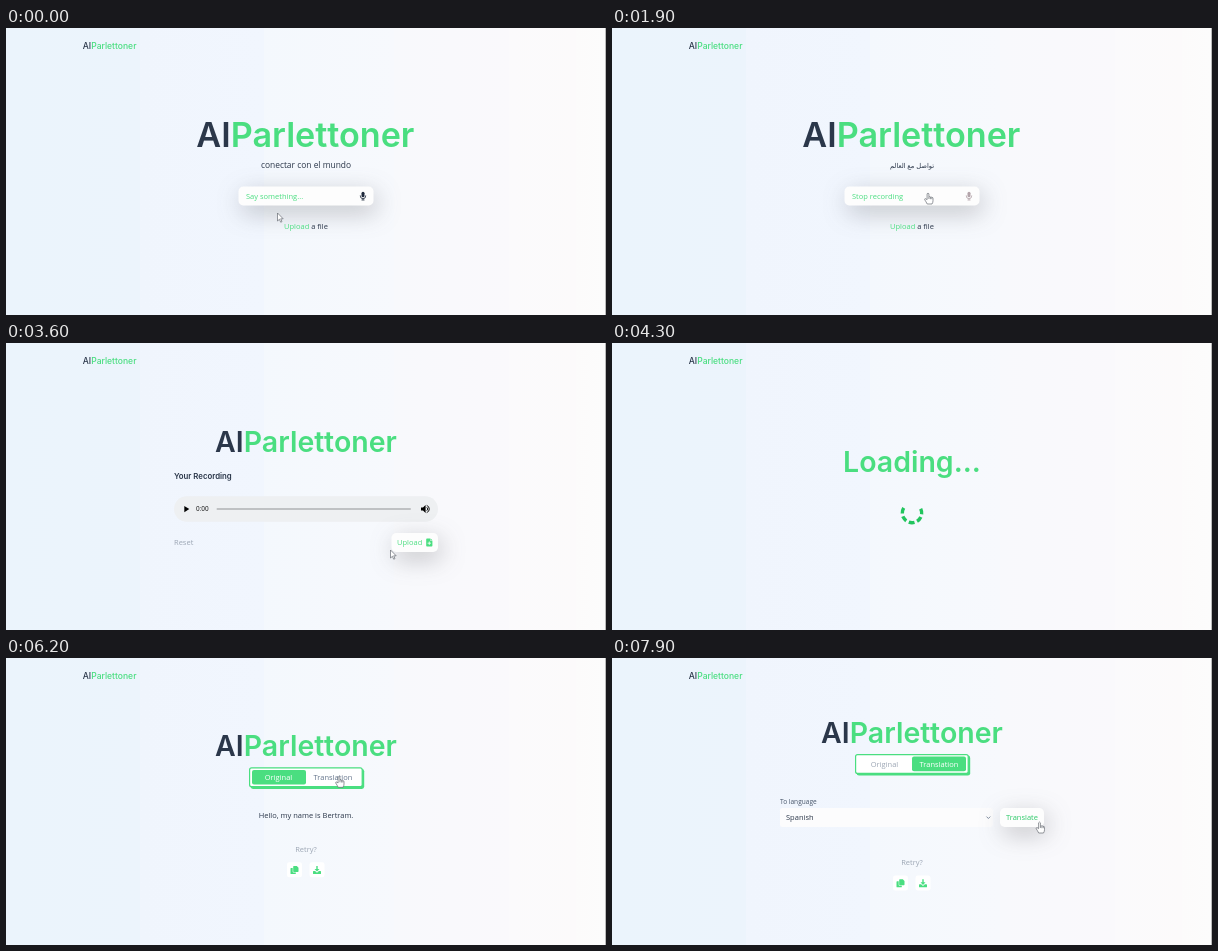
Recreate the animation shown at these times as an HTML page. Size 600 by 287 pixels, loop 8000 ms.

```html
<!DOCTYPE html>
<html lang="en">
<head>
<meta charset="utf-8">
<title>Interpreter demo</title>
<style>
  html, body { margin: 0; width: 100%; height: 100%; overflow: hidden; }
  svg { display: block; width: 100%; height: 100%; }
  text { font: 7.5px "Open Sans", "Noto Sans", sans-serif; fill: #2b374a; white-space: pre; }
  .head { font-family: Inter, sans-serif; font-weight: 600; }
  .mid { text-anchor: middle; }
  .end { text-anchor: end; }
  .green { fill: #4ade80; }
  .grey { fill: #9ca6b4; }
  .raised { fill: #fdfdfd; filter: drop-shadow(3px 7px 12px rgba(75, 75, 82, .32)); }
  .hover { fill: #2cc968; }
</style>
</head>
<body>
<svg id="stage" viewBox="0 0 600 287" preserveAspectRatio="none"></svg>
<script>
const LOOP = 8000;
const stage = document.getElementById('stage');

const text = (x, y, s, cls = '', style = '', id = '') =>
  `<text ${id && `id="${id}"`} x="${x}" y="${y}" class="${cls}" style="${style}">${s}</text>`;
const box = (x, y, w, h, r, attrs = 'fill="#fff"') =>
  `<rect x="${x}" y="${y}" width="${w}" height="${h}" rx="${r}" ${attrs}/>`;
const group = (id, body, attrs = '') => `<g id="${id}" ${attrs}>${body}</g>`;
const at = (x, y, body) => `<g transform="translate(${x} ${y})">${body}</g>`;

// Two-colour name, split at x
const brand = (x, y, size, weight = 600) => {
  const style = `font-size:${size}px;font-weight:${weight}`;
  return text(x, y, 'AI', 'head end', style) +
    text(x, y, 'Parlettoner', 'head green', style);
};

const mic = at(357, 168, `<g id="mic">
  ${box(-1.5, -4.2, 3, 5.4, 1.5, 'stroke="none"')}
  <path d="M-2.7-.6V0a2.7 2.7 0 0 0 5.4 0v-.6M0 2.7V4M-1.5 4h3" fill="none" stroke-width=".8"/></g>`);

const speaker = at(415, 166, `<path d="M0-1.5h2L4.6-4v8L2 1.5H0z"/>
  <path d="M5.7-1.7a2 2 0 0 1 0 3.4M5.7-3.6a3.8 3.8 0 0 1 0 7.2" fill="none" stroke="#000" stroke-width=".9"/>`);

const fileIcon = at(420.2, 195.5, `<path class="green" d="M.8 0h3.2v2.2h2.2V7.2q0 .8-.8.8H.8Q0 8 0 7.2V.8Q0 0 .8 0zM4.4 0l1.8 1.8H4.4z"/>
  <path d="M3.1 3v3.4M1.4 4.7h3.4" stroke="#fff" stroke-width=".8"/>`);

const footer = y => text(300, y, 'Retry?', 'mid grey') +
  box(281, y + 10.3, 15, 15, 2.3) + box(303.5, y + 10.3, 15, 15, 2.3) +
  at(284.5, y + 14, `<path class="green" d="M3.3 0h3l1.7 1.7v3.6q0 .6-.6.6H3.3q-.6 0-.6-.6V.6Q2.7 0 3.3 0z
    M.6 2h1.6v3.8q0 .6.6.6h2.5v1q0 .6-.6.6H.6Q0 8 0 7.4V2.6Q0 2 .6 2z"/>`) +
  at(307, y + 14, `<path class="green" d="M3.3 0h1.4v3h1.8L4 5.6 1.5 3h1.8z
    M.6 5h1.5L4 6.7 5.9 5h1.5q.6 0 .6.6v1.8q0 .6-.6.6H.6Q0 8 0 7.4V5.6Q0 5 .6 5z"/>`);

const tabs = (y, active) => box(244.6, y + 1.6, 113.6, 20, 2.4, 'class="green"') +
  box(243.6, y + .6, 112.6, 18.8, 2, 'fill="#fff" stroke="#4ade80" stroke-width="1.2"') +
  box(active ? 300 : 246, y + 2.6, 54, 14.6, 2, 'class="green"') +
  ['Original', 'Translation'].map((s, i) =>
    text(i ? 327 : 272.5, y + 12.6, s, 'mid' + (i === active ? '' : ' grey'),
      i === active ? 'fill:#fff' : i ? 'fill:#64748b' : '')).join('');

// Scene: id, start time, content
const scenes = [
  ['home', 0,
    brand(224.7, 118.5, 34.2) +
    text(300, 140, '', 'mid', '', 'tagline') +
    box(232.5, 158.5, 135, 19, 4.7, 'class="raised"') +
    text(240, 170.7, '', 'green', '', 'prompt') + mic +
    text(278, 200.5, '<tspan class="green">Upload</tspan> a file')],
  ['recording', 3000,
    brand(237.7, 108.5, 28.5) +
    text(168, 135.5, 'Your Recording', 'head', 'font-size:7.8px') +
    box(168, 153.3, 264, 25.4, 12.7, 'fill="#eef0f2"') +
    '<path d="M178.3 162.9v6.4l5-3.2z"/>' +
    text(190, 168.4, '0:00', '', 'font:6.56px Roboto,sans-serif;fill:#222') +
    box(210.5, 165.1, 194.5, 1.9, .9, 'fill="#bfc1c3"') + speaker +
    text(168, 202, 'Reset', 'grey') +
    box(385.5, 190, 46.5, 19, 4.7, 'class="raised"') +
    text(391, 202, 'Upload', 'green', '', 'upload') + fileIcon],
  ['loading', 4200,
    text(300, 129, 'Loading...', 'head green mid', 'font-size:28.5px') +
    at(300, 170, `<circle id="spinner" r="9.7" pathLength="360" fill="none" stroke="#22c55e"
      stroke-width="3.4" stroke-dasharray="34 17 34 17 34 17 34 17 34 122"/>`)],
  ['result', 5200,
    brand(237.7, 97.8, 28.5) + tabs(109.3, 0) +
    text(300, 160.2, 'Hello, my name is Bertram.', 'mid') + footer(194)],
  ['translation', 6400,
    brand(237.7, 84.5, 28.5) + tabs(96, 1) +
    text(168, 146, 'To language', '', 'font-size:6.56px;font-weight:500;fill:#475569') +
    box(168, 150, 213, 19, 2.3, 'fill="#fcfcfd"') +
    text(174, 162.2, '', '', '', 'choice') +
    '<path d="M374.5 158.6l1.9 1.9 1.9-1.9" fill="none" stroke="#64748b" stroke-width=".8"/>' +
    box(388, 150, 44, 19, 4.7, 'class="raised"') +
    text(410, 162.2, 'Translate', 'mid green', '', 'translate') +
    footer(207.3)]
];

// Background bands: x, colour at start, colour at end
const bands = [[0, '#ebf4fc', '#ecf4fc'], [134, '#f0f5fd', '#f1f6fe'], [258, '#f4f8fd', '#f7f9fd'],
  [388, '#f8f9fc', '#faf9fc'], [503, '#fbfafc', '#fcfafb'], [570, '#fcfbfb', '#fcfcfc'], [600]];
const stops = bands.slice(0, -1).map(([x, a, b], i) =>
  `<stop offset="${x / 600}" stop-color="${a}"/><stop offset="${bands[i + 1][0] / 600}" stop-color="${b}"/>`).join('');

stage.innerHTML =
  `<defs><linearGradient id="sky">${stops}</linearGradient></defs>` +
  box(0, 0, 600, 287, 0, 'fill="url(#sky)"') +
  box(599.2, 0, .8, 287, 0, 'fill="#aaa"') +
  brand(85.2, 20.7, 8.55, 500) +
  scenes.map(([id, , body]) => group(id, body)).join('') +
  group('cursor', `
    <path id="arrow" d="M0 0v8l1.9-1.7 1.3 2.9 1.3-.6-1.3-2.8h2.5z"/>
    <path id="hand" d="M-.9.8q.9-1.5 1.8 0v3.1q.8-.6 1.5.2.8-.5 1.4.3 1.2-.2 1.2 1v2.3Q5 9.4 4 11H-.8Q-1.9 8.8-3.3 6.7q-.2-1.2 1-1l1.4 1z
      M.9 4v2M2.4 4.2v2M3.8 4.5v1.7"/>`,
    'fill="#fff" stroke="#5c6068" stroke-width=".65" stroke-linejoin="round"');

const el = {};
stage.querySelectorAll('[id]').forEach(e => el[e.id] = e);

// Pointer path: time, x, y
const path = [[0, 271.5, 185], [150, 271.5, 185], [850, 316, 165], [3000, 316, 165],
  [3600, 384.5, 207], [3700, 384.5, 207], [4000, 402, 201], [5200, 322, 106],
  [5400, 322, 106], [5750, 333, 118.3], [6500, 333, 118.3], [6900, 321.5, 153],
  [7050, 321.5, 157], [7500, 321.5, 157], [7900, 427.5, 164], [LOOP, 427.5, 164]];

const pointer = t => {
  const i = Math.max(1, path.findIndex(p => p[0] > t));
  const [t0, x0, y0] = path[i - 1], [t1, x1, y1] = path[i];
  const u = (t - t0) / (t1 - t0), k = u * u * (3 - 2 * u);
  return [x0 + (x1 - x0) * k, y0 + (y1 - y0) * k];
};
const inside = (x, y, l, t, r, b) => x > l && x < r && y > t && y < b;
const show = (e, on) => e.style.display = on ? '' : 'none';

function draw(t) {
  const now = scenes.filter(s => s[1] <= t).pop()[0];
  scenes.forEach(([id]) => show(el[id], id === now));

  const recording = t >= 1000;
  el.tagline.textContent = recording ? 'تواصل مع العالم' : 'conectar con el mundo';
  el.tagline.style.fontSize = recording ? '6.7px' : '8.44px';
  el.tagline.style.fontWeight = recording ? 400 : 500;
  el.prompt.textContent = recording ? 'Stop recording' : 'Say something...';
  el.mic.style.fill = el.mic.style.stroke = recording ? '#b3a4aa' : '#1e293b';
  el.choice.textContent = t < 7400 ? 'Select language' : 'Spanish';
  el.spinner.setAttribute('transform', `rotate(${153 + (t - 4800) * .36})`);

  const [x, y] = pointer(t);
  const over = {
    home: inside(x, y, 232, 158, 368, 178),
    recording: inside(x, y, 385, 190, 432, 209),
    result: inside(x, y, 300, 112, 354, 127),
    translation: inside(x, y, 388, 150, 432, 169) || inside(x, y, 246, 98, 354, 114)
  }[now];
  el.upload.classList.toggle('hover', !!over);
  el.translate.classList.toggle('hover', inside(x, y, 388, 150, 432, 169));
  show(el.cursor, now !== 'loading');
  show(el.hand, over);
  show(el.arrow, !over);
  el.cursor.setAttribute('transform', `translate(${x} ${y})`);
}

const start = performance.now();
function tick() {
  draw((performance.now() - start) % LOOP);
  requestAnimationFrame(tick);
}
tick();
</script>
</body>
</html>
```
